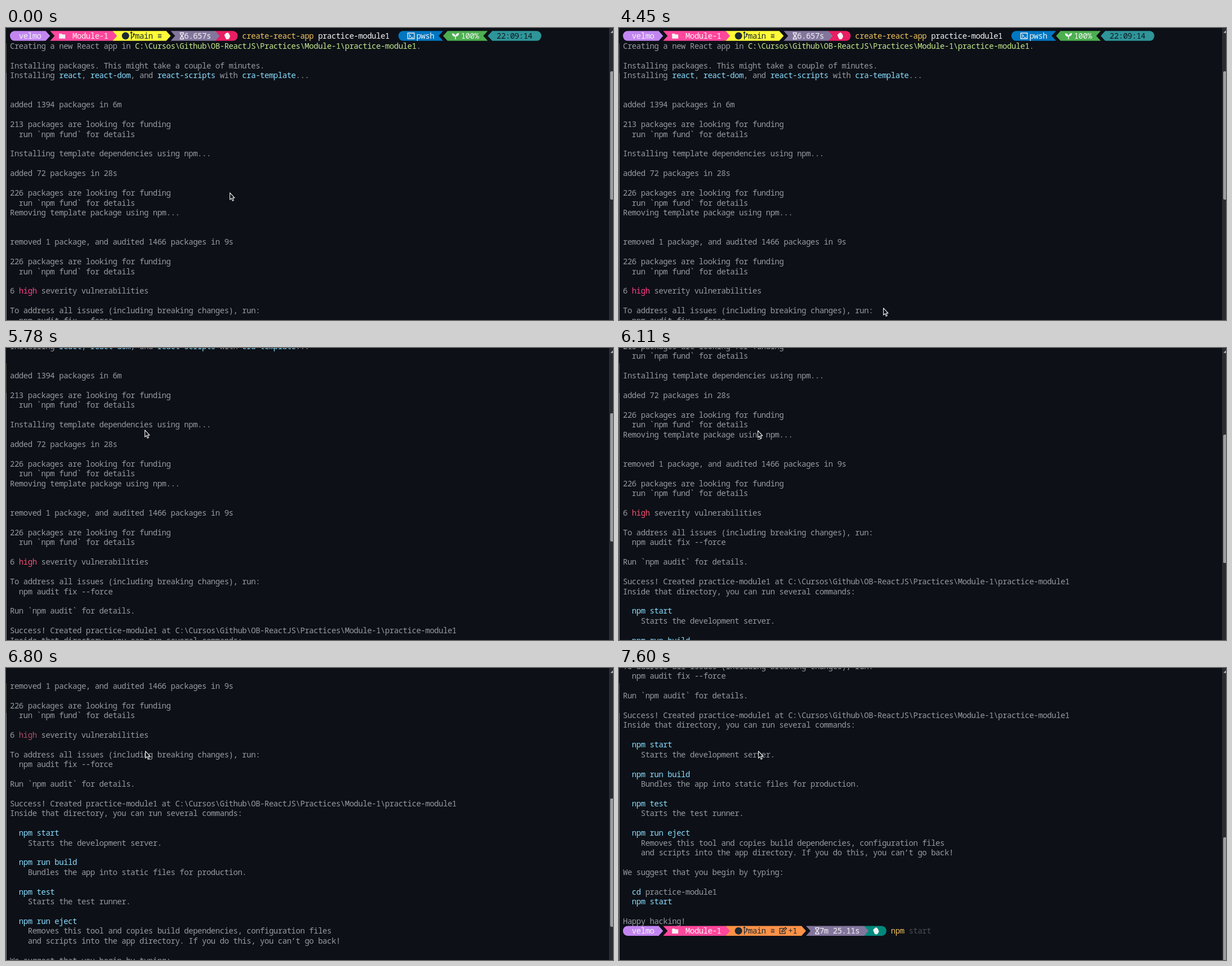
An HTML page for the animation above (8 s loop, 1078x519 px).

```html
<!DOCTYPE html>
<html lang="en">
<head>
<meta charset="utf-8">
<title>Terminal</title>
<style>
html, body { margin: 0; width: 100%; height: 100%; overflow: hidden; background: #0d1017; }
svg { display: block; width: 1078px; height: 519px; }
text {
  font: 14px "Noto Sans Mono", "DejaVu Sans Mono", monospace;
  letter-spacing: -0.47px;
  font-variant-ligatures: none;
  white-space: pre;
}
</style>
</head>
<body>
<svg viewBox="0 0 1078 519">
  <rect width="1078" height="519" fill="#0d1017"/>
  <g id="rows"></g>
  <path d="M.5 27V80" stroke="#4b4a3c"/>
  <path d="M.5 80V519" stroke="#85878a"/>
  <rect x="1071" width="7" height="519" fill="#2a2b30"/>
  <path d="M1073.500 9L1077 4.500L1080.500 9Z" fill="#a3a4a6"/>
  <rect id="thumb" x="1073" y="77" width="8" height="228" rx="2" fill="#9c9da0"/>
  <path id="mouse" d="M.6 .8V13.200L3.400 10.600L5.300 15.200L7.300 14.300L5.400 9.900H9Z"
    fill="#0d1017" stroke="#f2f2f2" stroke-width="1.100" stroke-linejoin="round"/>
</svg>
<script>
const LOOP = 8000, W = 7.93, H = 17.43, LEFT = 7, MID = 14;
const GREY = '#989aa0', CYAN = '#89ddff', LIME = '#c3e88d', GOLD = '#f0c35e', WHITE = '#f4f4f6', INK = '#1c2a33';
const rows = document.getElementById('rows');
const colX = c => LEFT + c * W;
const rowY = r => MID + r * H;

function add(tag, attrs, text) {
  const el = document.createElementNS('http://www.w3.org/2000/svg', tag);
  for (const k in attrs) el.setAttribute(k, attrs[k]);
  if (text) el.textContent = text;
  return rows.appendChild(el);
}

const put = (row, col, text, fill = GREY) =>
  add('text', { x: colX(col), y: rowY(row) + 5.3, fill }, text);

// A run of [text, colour] pieces laid out by column
function line(row, ...parts) {
  let col = 0;
  return parts.map(p => {
    const [text, fill] = [].concat(p);
    const pad = text.length - text.trimStart().length;
    const el = put(row, col + pad, text.trim(), fill);
    col += text.length;
    return el;
  });
}

// Prompt segment; each end is flat, tip, notch or round
function band(row, from, to, fill, left, right) {
  const a = colX(from), b = colX(to), m = rowY(row), t = m - H / 2, u = m + H / 2;
  const ends = {
    flat: [`L${b} ${t}L${b} ${u}`, `L${a} ${u}L${a} ${t}`],
    tip: [`L${b - W} ${t}L${b} ${m}L${b - W} ${u}`, `L${a + W} ${u}L${a} ${m}L${a + W} ${t}`],
    notch: [`L${b} ${t}L${b - W} ${m}L${b} ${u}`, `L${a} ${u}L${a + W} ${m}L${a} ${t}`],
    round: [`L${b - W} ${t}A${W} ${H / 2} 0 0 1 ${b - W} ${u}`, `L${a + W} ${u}A${W} ${H / 2} 0 0 1 ${a + W} ${t}`]
  };
  const start = `M${left === 'tip' || left === 'round' ? a + W : a} ${t}`;
  add('path', { d: start + ends[right][0] + ends[left][1] + 'Z', fill });
}

// Icon paths around a left-middle point: [path, filled]
const ICONS = {
  folder: ['M0-4H4.500L6 -2.600H11V4.800H0Z', 1],
  dot: ['M.5 0a6.500 6.500 0 1 1 13 0a6.500 6.500 0 1 1-13 0Z', 1],
  branch: ['M1.500-6.500V6.500M1.500 3Q6 2 6-2.500M-.3-5L1.500-7L3.300-5M4.300-2L6-4L7.700-2', 0],
  glass: ['M.3-5.500H7.700M.3 5.500H7.700M1.300-5.500V-3.500L6.700 3.500V5.500M6.700-5.500V-3.500L1.300 3.500V5.500', 0],
  hand: ['M1 1L0-2.500L2-3L2.600-5H4.400L5-6H6.700L7.200-4.500L9-4V-2L10.500 0L9.500 3.500L7.500 6H3.500Z', 1],
  shell: ['M.7-5H12.300V5H.7ZM3-2.500L5.500 0L3 2.500M6.500 2.700H10', 0],
  sprout: ['M0-4.500Q5.600-4.500 6.200 .2Q7-5 12.500-5.200Q12.500 .5 7 1V6H5.500V1.500Q0 1 0-4.500Z', 1],
  edit: ['M8-4.500H1V5H10.500V1M4.500 2L5-.5L11-6L13-4L7 1.500Z', 0]
};
function icon(row, col, name, colour) {
  const [d, solid] = ICONS[name];
  add('path', {
    d, transform: `translate(${colX(col)} ${rowY(row)})`,
    fill: solid ? colour : 'none', stroke: solid ? 'none' : colour, 'stroke-width': 1.3
  });
}

function prompt(row, gitFill, gitEnd, clock, doneFill) {
  const done = gitEnd + 3 + clock.length;
  band(row, done + 1, done + 6, doneFill, 'flat', 'round');
  band(row, gitEnd, done + 2, '#83769c', 'notch', 'tip');
  band(row, 23, gitEnd, gitFill, 'flat', 'tip');
  band(row, 9, 24, '#ff479c', 'notch', 'tip');
  band(row, 0, 9, '#c386f1', 'round', 'tip');
  put(row, 2, 'velmo', WHITE);
  icon(row, 11, 'folder', WHITE);
  put(row, 14, 'Module-1', WHITE);
  icon(row, 25, 'dot', INK);
  icon(row, 27, 'branch', INK);
  put(row, 28, 'main ≡', INK);
  icon(row, gitEnd + 2, 'glass', WHITE);
  put(row, gitEnd + 3, clock, WHITE);
  icon(row, done + 3, 'hand', WHITE);
}

prompt(0, '#fffb38', 36, '6.657s', '#e91e63');
put(0, 52, 'create-react-app', GOLD);
put(0, 69, 'practice-module1', WHITE);
band(0, 87, 97, '#0077c2', 'round', 'notch');
icon(0, 89, 'shell', WHITE);
put(0, 91, 'pwsh', WHITE);
band(0, 97, 107, '#4caf50', 'tip', 'notch');
icon(0, 99, 'sprout', WHITE);
put(0, 101, '100%', WHITE);
band(0, 107, 119, '#2e9599', 'tip', 'round');
put(0, 109, '22:09:14', '#111a20');

const PATH = 'C:\\Cursos\\Github\\OB-ReactJS\\Practices\\Module-1\\practice-module1';
const fund = (row, n) => {
  line(row, n + ' packages are looking for funding');
  line(row + 1, '  run `npm fund` for details');
};
line(1, 'Creating a new React app in ', [PATH, LIME], '.');
line(3, 'Installing packages. This might take a couple of minutes.');
line(4, 'Installing ', ['react', CYAN], ', ', ['react-dom', CYAN], ', and ',
  ['react-scripts', CYAN], ' with ', ['cra-template', CYAN], '...');
line(7, 'added 1394 packages in 6m');
fund(9, 213);
line(12, 'Installing template dependencies using npm...');
line(14, 'added 72 packages in 28s');
fund(16, 226);
line(18, 'Removing template package using npm...');
line(21, 'removed 1 package, and audited 1466 packages in 9s');
fund(23, 226);
const high = line(26, '6 ', ['high', '#ff3f85'], ' severity vulnerabilities')[1];
line(28, 'To address all issues (including breaking changes), run:');
line(29, '  npm audit fix --force');
line(31, 'Run `npm audit` for details.');
line(33, 'Success! Created practice-module1 at ' + PATH);
line(34, 'Inside that directory, you can run several commands:');
line(36, ['  npm start', CYAN]);
line(37, '    Starts the development server.');
line(39, ['  npm run build', CYAN]);
line(40, '    Bundles the app into static files for production.');
line(42, ['  npm test', CYAN]);
line(43, '    Starts the test runner.');
line(45, ['  npm run eject', CYAN]);
line(46, '    Removes this tool and copies build dependencies, configuration files');
line(47, '    and scripts into the app directory. If you do this, you can’t go back!');
line(49, 'We suggest that you begin by typing:');
line(51, ['  cd', CYAN], ' practice-module1');
line(52, ['  npm start', CYAN]);
line(54, 'Happy hacking!');

prompt(55, '#ff9248', 41, '7m 25.11s', '#00897b');
icon(55, 35, 'edit', INK);
put(55, 37, '+1', INK);
put(55, 60, 'npm', GOLD);
put(55, 64, 'start', '#4b4d52');

// Endless stepped animation from [time, value] pairs
function play(el, steps, style) {
  const frames = steps.map(([t, v]) => ({ offset: t / LOOP, easing: 'step-end', ...style(v) }));
  frames.push({ ...frames[frames.length - 1], offset: 1 });
  el.animate(frames, { duration: LOOP, iterations: Infinity }).startTime = 0;
}

const scroll = [[0, 0], [5240, 5], [5910, 10], [6320, 15], [6800, 20], [7130, 25], [7530, 29]];
const shift = (x, y) => ({ transform: `translate(${x}px, ${y}px)` });
play(rows, scroll, n => shift(0, -n * H));
play(document.getElementById('thumb'), scroll, n => shift(0, n * 7.73));
play(high, [[0, '#ff3f85'], [5240, '#f4506f'], [6800, '#b04c66'], [7130, '#7c4a5c']], fill => ({ fill }));

const glide = Array.from({ length: 9 }, (_, i) => {
  const k = (i + 1) / 9, e = k * k * (3 - 2 * k);
  return [4510 + 81 * i, [469 - 221 * e, 497 - 350 * e]];
});
const hidden = [-50, -50];
play(document.getElementById('mouse'), [
  [0, [397, 292]], [70, hidden], [4450, [469, 497]], ...glide,
  [5640, [247, 146]], [5710, [246, 145]], [6110, [246, 146]], [6180, [247, 147]]
], p => shift(...p));
</script>
</body>
</html>
```
